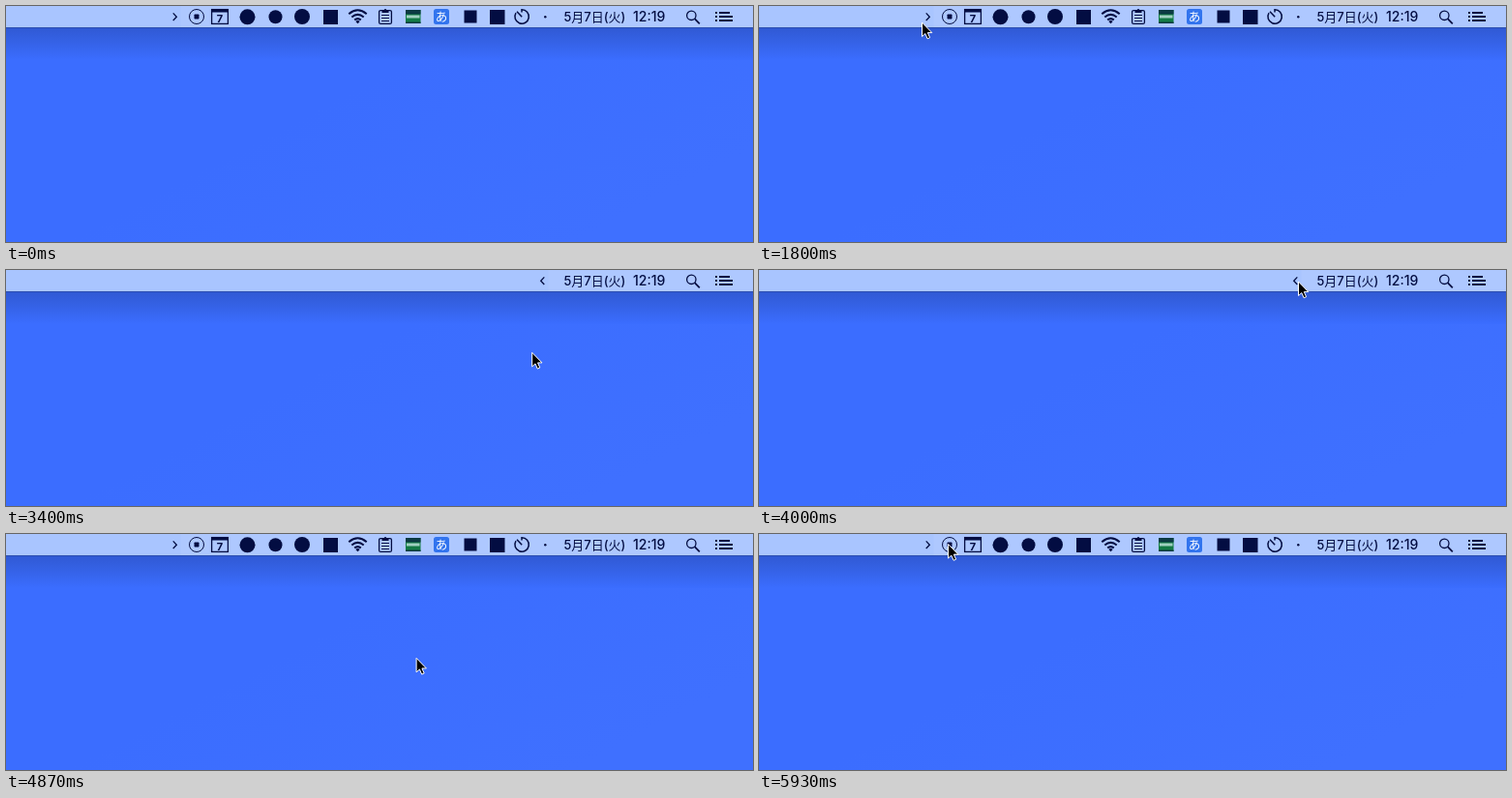
An HTML page for the animation above (5.99 s loop, 772 by 244 pixels).

```html
<!DOCTYPE html>
<html lang="ja">
<head>
<meta charset="utf-8">
<title>Menu bar</title>
<style>
  html, body { margin: 0; width: 100%; height: 100%; overflow: hidden; background: #3b6dff; }
  svg { display: block; width: 100vw; height: 100vh; }
  text { font-family: Inter, "Noto Sans CJK JP", "Noto Sans CJK", sans-serif; }
  .ink { fill: #030d42; }
  .line { fill: none; stroke: #030d42; stroke-width: 1.3; }
  .bold { stroke-width: 2; }
</style>
</head>
<body>
<svg viewBox="0 0 772 244">
  <defs>
    <linearGradient id="shade" x1="0" y1="0" x2="0" y2="1">
      <stop offset="0" stop-color="#3059d3"/>
      <stop offset=".45" stop-color="#3562e6"/>
      <stop offset="1" stop-color="#3b6dff"/>
    </linearGradient>
    <linearGradient id="desk" x1="0" y1="0" x2="1" y2=".6">
      <stop offset=".5" stop-color="#3b6dff"/>
      <stop offset="1" stop-color="#3f70ff"/>
    </linearGradient>
  </defs>
  <rect width="772" height="244" fill="url(#desk)"/>
  <rect y="22" width="772" height="34" fill="url(#shade)"/>
  <rect width="772" height="22" fill="#a9c5ff"/>
  <rect id="tray" width="772" height="22" fill="#aec8ff"/>
  <rect y="22" width="772" height="1" fill="#2b4dae"/>

  <g id="left" class="ink">
    <circle class="line" cx="197" cy="11" r="7.5" style="stroke-width:1"/>
    <rect x="194.5" y="8.5" width="5" height="5" rx=".8"/>
    <rect class="line" x="212.6" y="3.6" width="16.8" height="14.8"/>
    <rect x="212" y="3" width="18" height="3.5"/>
    <text x="221" y="16.7" font-size="11" font-weight="700" text-anchor="middle">7</text>
    <circle cx="249.5" cy="11.3" r="8"/>
    <circle cx="278.5" cy="11.3" r="7"/>
    <circle cx="306" cy="11" r="8"/>
    <rect x="328" y="4" width="15" height="15"/>
    <path class="line bold" d="M354.3 8.2Q363.5 .4 372.7 8.2M357.3 11.5Q363.5 6.2 369.7 11.5M360.2 14.4Q363.5 11.8 366.8 14.4"/>
    <path d="M361.3 15.9Q363.5 14.2 365.7 15.9L363.5 18.2Z"/>
    <rect class="line" x="385.6" y="4.6" width="12.8" height="13.8" rx="1.5"/>
    <path d="M388.5 7V4.2H390.5Q392 1.6 393.5 4.2H395.5V7Z"/>
    <path class="line" d="M388 9.5h8m-8 3h8m-8 3h8" style="stroke-width:1"/>
  </g>

  <g id="right" class="ink">
    <rect x="413" y="4" width="15.5" height="14" fill="#127a45"/>
    <rect x="413" y="4" width="15.5" height="4.5" fill="#0b3a42"/>
    <rect x="414" y="9.5" width="13.5" height="3" fill="#9fd0c0"/>
    <rect x="413" y="16.5" width="15.5" height="1.5" fill="#0b3a42"/>
    <rect x="442" y="3" width="16" height="16" rx="2.5" fill="#3274ee"/>
    <text x="450" y="15.6" font-size="12.5" font-weight="500" text-anchor="middle" fill="#fff">あ</text>
    <rect x="473.5" y="4.5" width="13" height="13"/>
    <rect x="500" y="4" width="15.5" height="15"/>
    <path class="line" d="M533 6.5V3.8A7.2 7.2 0 1 1 527 7.2M528 5.8L533.2 11.2" style="stroke-width:1.5"/>
    <circle cx="557.3" cy="11.2" r="1.2"/>
  </g>

  <path id="chevron" class="line" d="M-1.8 -3.8L1.8 0L-1.8 3.8"/>
  <g class="ink" font-weight="500">
    <text x="576.5" y="16" font-size="13">5月7日(火)</text>
    <text x="648" y="16" font-size="14">12:19</text>
    <circle class="line" cx="708.3" cy="9.8" r="4.7"/>
    <path class="line" d="M711.7 13.2L716.8 18.3" style="stroke-width:1.8"/>
    <path class="line bold" d="M733 7h2m2 0h11M733 11h2m2 0h14M733 15h2m2 0h14"/>
  </g>
  <path id="cursor" d="M.5 1V15.6L3.8 12.6L6.1 17.8L8.6 16.7L6.3 11.6H10.8Z"
        stroke="#fff" stroke-linejoin="round"/>
</svg>
<script>
const LOOP = 5990, STEP = 200 / 3;
const $ = id => document.getElementById(id);
const show = (id, on) => $(id).style.display = on ? '' : 'none';
const easeOut = u => 1 - (1 - u) ** 1.5;

// Pointer strokes: from, until, x, y
const entry = [300, 209];
const strokes = [
  [1000, 1670, 163, 23], [1670, 1800, 168, 16], [1800, 2130, 176, 9],
  [2670, 3130, 586, 122], [3330, 3600, 468, 18], [3600, 4000, 557, 11],
  [4200, 4530, 612, 51], [4530, 4930, 412, 132], [4930, 5130, 415, 151],
  [5130, 5730, 192, 10], [5860, 5930, 195, 9.5]
];

function pointerAt(t) {
  let [x, y] = entry;
  for (const [from, until, toX, toY] of strokes) {
    if (t <= from) break;
    const s = easeOut(Math.min(1, (t - from) / (until - from)));
    x += (toX - x) * s;
    y += (toY - y) * s;
  }
  return [x, y];
}

function draw(ms) {
  const t = Math.round(Math.floor((ms + 3.4) / STEP) * STEP / 10) * 10;
  const leftOpen = t < 2470 || t >= 4400;
  const rightOpen = t < 2530 || t >= 4330;
  const flip = t >= 2400 && t < 4600 ? -1 : 1;
  const edge = leftOpen ? 174.5 : rightOpen ? 402.5 : 554.5;
  show('left', leftOpen);
  show('right', rightOpen);
  $('tray').setAttribute('x', edge + 6);
  $('chevron').setAttribute('transform', `translate(${edge} 11.2) scale(${flip} 1)`);
  show('cursor', t >= 1000);
  const [x, y] = pointerAt(t);
  $('cursor').setAttribute('transform', `translate(${x.toFixed(1)} ${y.toFixed(1)})`);
}

const start = performance.now();
function tick() {
  draw((performance.now() - start) % LOOP);
  requestAnimationFrame(tick);
}
draw(0);
requestAnimationFrame(tick);
</script>
</body>
</html>
```
